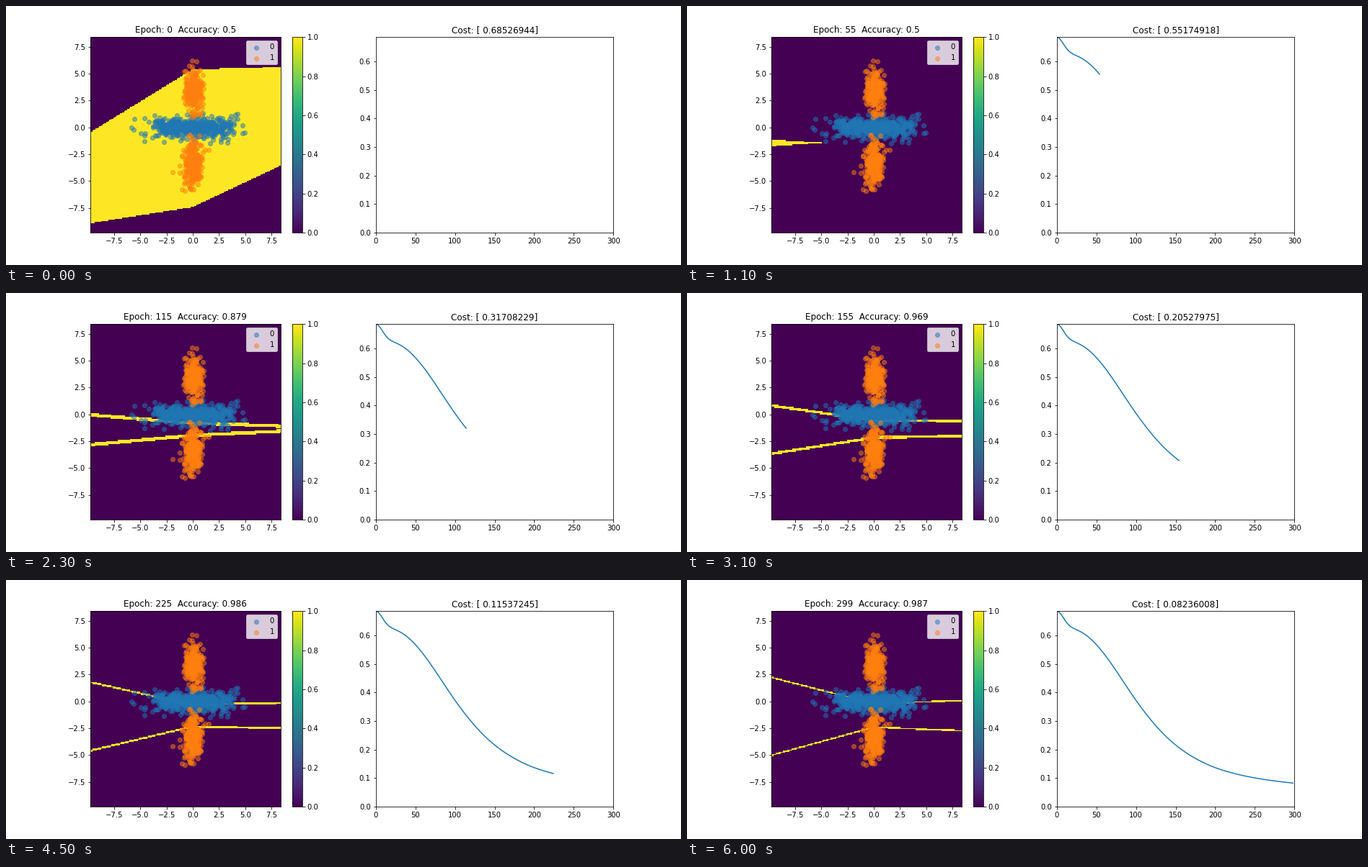
Write a matplotlib script that moves like this. It is 936 px wide and 360 px high and loops after 6100 ms.

```python
import matplotlib.pyplot as plt
import numpy as np
from matplotlib.animation import FuncAnimation

plt.rcParams["font.family"] = "DejaVu Sans"
W, H, DPI = 936, 360, 72
FRAMES, INTERVAL, LAST_EPOCH = 61, 100, 299
X_LIM, Y_LIM = (-9.773, 8.377), (-9.79, 8.41)
CELL = 0.1

# Epochs with an exactly known cost; the curve passes through them
COST_KEYS = {0: 0.68526944, 55: 0.55174918, 115: 0.31708229, 155: 0.20527975,
             195: 0.14193145, 255: 0.0982297, 299: 0.08236008}

# Upper and lower arm of the decision band: heights at the left edge, the knee
# and the right edge, before training and after it, and the change on the way
KNOTS = (-9.8, 0, 8.4)
START = np.array([(-4.45, 1.4, 1.6), (-4.9, -3.4, 0.45)])
END = np.array([(2.45, -0.15, 0.2), (-5.22, -2.45, -2.85)])
DRIFT = np.array([(-3.81, -0.9, -2.0), (3.66, 0.64, 1.95)])
PINCH = np.array([(0, -0.9, 0), (0, 0.9, 0)])


def cost_trend(e):
    """Quick first drop, short plateau, then a long decay."""
    return (0.05 + 0.58 / (1 + (e / 108.2) ** 2.8)
            + 0.05526944 * np.exp(-(e / 11.5) ** 2))


def cost_curve(e):
    keys = np.array(list(COST_KEYS))
    gap = np.array(list(COST_KEYS.values())) - cost_trend(keys)
    return cost_trend(e) + np.interp(e, keys, gap)


def accuracy(epoch):
    return 0.987 - 0.487 * np.exp(-max(0, epoch - 81.4) / 22.3)


def centres(lim):
    n = round((lim[1] - lim[0]) / CELL)
    return lim[0] + (np.arange(n) + 0.5) * (lim[1] - lim[0]) / n


grid_x, grid_y = centres(X_LIM), centres(Y_LIM)[:, None]


def band(epoch):
    """Cells near the class boundary; the arms merge where they cross."""
    left = np.exp(-(max(0, epoch - 55) / 112) ** 1.36)
    fresh = np.exp(-epoch / 8)
    trained = END + DRIFT * left + PINCH * left ** 6
    arms = trained + (START - trained) * fresh
    half = 0.065 + 0.14 * left
    half += (4 - half) * fresh
    top, bottom = (np.interp(grid_x, KNOTS, arm) for arm in arms)
    reach = np.abs(grid_y - (top + bottom) / 2)
    return (np.abs(reach - (top - bottom) / 2) < half).astype(float)


def clusters(rng, shift, spread, n=250):
    """Two mirrored normal clouds at plus and minus shift."""
    return np.vstack([rng.normal(side * np.array(shift), spread, (n, 2))
                      for side in (-1, 1)])


epochs = np.arange(LAST_EPOCH + 1)
cost = cost_curve(epochs)

fig, (ax, cost_ax) = plt.subplots(1, 2, figsize=(W / DPI, H / DPI), dpi=DPI,
                                  facecolor="white", gridspec_kw={"bottom": 0.125})

image = ax.imshow(band(0), extent=(*X_LIM, *Y_LIM), origin="lower", vmin=0, vmax=1,
                  cmap="viridis", interpolation="nearest", aspect="auto")
fig.colorbar(image, ax=ax, ticks=np.arange(6) / 5)
rng = np.random.default_rng(4)
blue = clusters(rng, (1.6, 0), (1.35, 0.5))
orange = clusters(rng, (0.05, 3.4), (0.47, 1.05))
for points, color, label in ((blue, "C0", "0"), (orange, "C1", "1")):
    ax.scatter(*points.T, color=color, alpha=0.5, label=label)
ax.legend(loc="upper right")
ticks = np.arange(-7.5, 8, 2.5)
ax.set(xlim=X_LIM, ylim=Y_LIM, xticks=ticks, yticks=ticks)

line, = cost_ax.plot([], [], lw=1.5)
cost_ax.set(xlim=(0, 300), ylim=(0, cost[0]), yticks=np.arange(7) / 10)
title = ax.set_title("")
cost_title = cost_ax.set_title("")


def update(frame):
    epoch = min(5 * frame, LAST_EPOCH)
    image.set_data(band(epoch))
    line.set_data(epochs[:epoch], cost[:epoch])
    title.set_text(f"Epoch: {epoch}  Accuracy: {round(float(accuracy(epoch)), 3)}")
    value = f"{cost[epoch]:.8f}".rstrip("0")
    cost_title.set_text(f"Cost: [ {value}]")
    return image, line, title, cost_title


anim = FuncAnimation(fig, update, frames=FRAMES, interval=INTERVAL, repeat=True)
plt.show()
```
